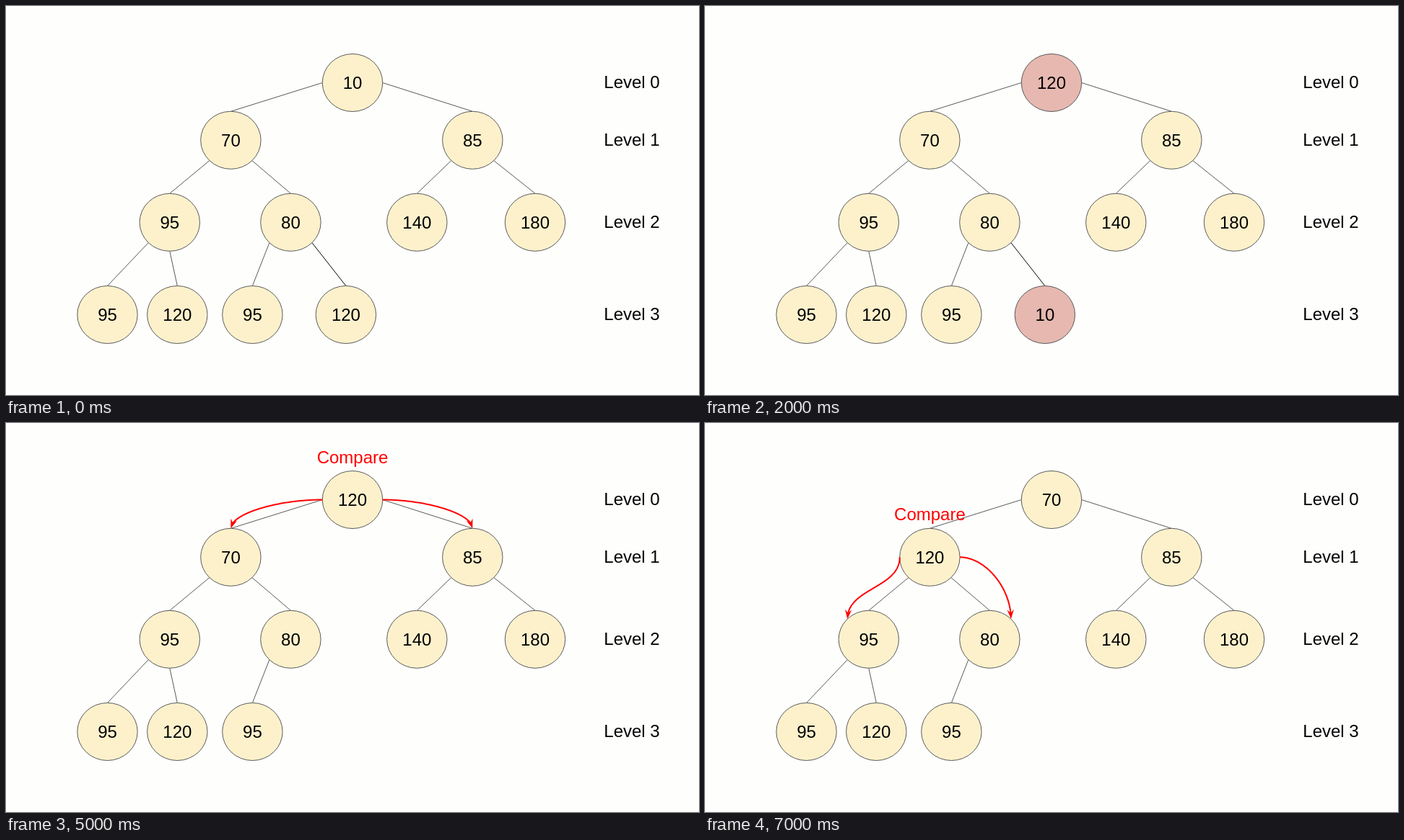
Animation of 960 by 540 pixels, one loop 8000 ms. Source, as an HTML page with a canvas:

```html
<!DOCTYPE html>
<html lang="en">
<head>
<meta charset="utf-8">
<title>Heap removal</title>
<style>
html, body { margin: 0; width: 100%; height: 100%; overflow: hidden; background: #fefffd; }
canvas { display: block; }
</style>
</head>
<body>
<canvas id="stage" width="960" height="540"></canvas>
<script>
(() => {
const ctx = document.getElementById('stage').getContext('2d');
const STEP = 1000;
const RX = 41.7, RY = 40;
const PAPER = '#fefffd', CREAM = '#fdf1cc', PINK = '#e6b8b0', CORAL = '#e06666', MINT = '#d9ead3';
const RED = '#ff0000', GREEN = '#6aa84f', LINE = '#595959';

// Node centres in heap order.
const nodes = [
  [480, 106.5], [311.4, 186.3], [646.3, 186.3],
  [226.8, 300.3], [394.4, 300.3], [569.3, 300.3], [733, 300.3],
  [140.5, 428.5], [237.3, 428.5], [341.4, 428.5], [470.9, 428.5]
];
const LAST = nodes.length - 1;
const values = [10, 70, 85, 95, 80, 140, 180, 95, 120, 95, 120];
const levels = [106, 185.8, 299.8, 428];

// Point on a node's rim, with dx and dy in units of its radii.
const rim = (i, dx, dy) => [nodes[i][0] + dx * RX, nodes[i][1] + dy * RY];
const leftOf = i => rim(i, -1, 0);
const rightOf = i => rim(i, 1, 0);
const topOf = i => rim(i, 0, -1);
const cornerOf = (i, sx, sy) => rim(i, sx * Math.SQRT1_2, sy * Math.SQRT1_2);

function drawText(str, x, baseline, color = '#000', align = 'center') {
  ctx.font = '24px "Liberation Sans", Arial, sans-serif';
  ctx.textAlign = align;
  ctx.fillStyle = color;
  ctx.fillText(str, x, baseline);
}

function drawEdge(child) {
  const parent = (child - 1) >> 1;
  const side = child % 2 ? -1 : 1;
  let from = cornerOf(parent, side, 1);
  if (parent === 0) from = rim(0, side, 0);
  if (child === 8) from = rim(parent, 0, 1);
  ctx.strokeStyle = child === LAST ? '#000' : LINE;
  ctx.beginPath();
  ctx.moveTo(...from);
  ctx.lineTo(...topOf(child));
  ctx.stroke();
}

function drawNode(i, value, fill) {
  const [x, y] = nodes[i];
  ctx.strokeStyle = LINE;
  ctx.beginPath();
  ctx.ellipse(x, y, RX, RY, 0, 0, Math.PI * 2);
  ctx.fillStyle = fill;
  ctx.fill();
  ctx.stroke();
  drawText(value, x, y + 8.8);
}

function drawTree({ swaps = {}, fills = {}, leaf = true }) {
  const count = leaf ? LAST + 1 : LAST;
  ctx.lineWidth = 1;
  for (let i = 1; i < count; i++) drawEdge(i);
  for (let i = 0; i < count; i++) drawNode(i, swaps[i] ?? values[i], fills[i] || CREAM);
  levels.forEach((y, i) => drawText('Level ' + i, 828.3, y + 8.4, '#000', 'left'));
}

function bezier([a, b, c, d], t) {
  const u = 1 - t;
  return [0, 1].map(k =>
    u * u * u * a[k] + 3 * u * u * t * b[k] + 3 * u * t * t * c[k] + t * t * t * d[k]);
}

// Stealth arrowhead whose mitred point lands on the tip.
function drawHead(tip, from) {
  ctx.save();
  ctx.translate(...tip);
  ctx.rotate(Math.atan2(tip[1] - from[1], tip[0] - from[0]));
  ctx.translate(-6.9, 0);
  ctx.beginPath();
  ctx.moveTo(0, 0);
  ctx.lineTo(-2.25, 2.25);
  ctx.lineTo(3.93, 0);
  ctx.lineTo(-2.25, -2.25);
  ctx.closePath();
  ctx.fill();
  ctx.stroke();
  ctx.restore();
}

function drawArrow(curves, color, bothEnds) {
  const points = curves.flatMap(c => Array.from({ length: 121 }, (_, i) => bezier(c, i / 120)));
  const start = points[0], end = points[points.length - 1];
  const clear = (p, q) => Math.hypot(p[0] - q[0], p[1] - q[1]) >= 6.9;
  const shaft = points.filter(p => clear(p, end) && (!bothEnds || clear(p, start)));
  ctx.strokeStyle = ctx.fillStyle = color;
  ctx.lineWidth = 2;
  ctx.beginPath();
  shaft.forEach(p => ctx.lineTo(...p));
  ctx.stroke();
  drawHead(end, shaft[shaft.length - 1]);
  if (bothEnds) drawHead(start, shaft[0]);
}

// Leaves horizontally, arrives vertically.
const bend = (a, b) => [a, [(a[0] + b[0]) / 2, a[1]], [b[0], (a[1] + b[1]) / 2], b];

// Leaves and arrives vertically.
function sway(a, b) {
  const mid = (a[1] + b[1]) / 2;
  return [a, [a[0], mid], [b[0], mid], b];
}

// Loops out to the right and back.
function loop(a, b, x) {
  const far = [x, (a[1] + b[1]) / 2];
  return [bend(a, far), bend(b, far).reverse()];
}

const rootSwap = { 0: 120, [LAST]: 10 };
const firstSwap = { 0: 70, 1: 120 };
const pruned = { swaps: rootSwap, leaf: false };

const scenes = [
  () => drawTree({}),
  () => {
    drawTree({});
    drawArrow(loop(rightOf(0), rightOf(LAST), 812), RED, true);
  },
  () => drawTree({ swaps: rootSwap, fills: { 0: PINK, [LAST]: PINK } }),
  () => {
    drawTree({ swaps: rootSwap, fills: { [LAST]: CORAL } });
    drawTree(pruned); // a stacked copy darkens the lines and labels
    drawText('Remove', 528.5, 437.3, RED, 'left');
  },
  () => {
    drawTree(pruned);
    drawTree(pruned);
  },
  () => {
    drawTree(pruned);
    drawArrow([bend(leftOf(0), topOf(1))], RED);
    drawArrow([bend(rightOf(0), topOf(2))], RED);
    drawText('Compare', 480, 55.6, RED);
  },
  () => {
    drawTree({ swaps: firstSwap, fills: { 0: MINT, 1: MINT }, leaf: false });
    drawArrow([bend(leftOf(0), topOf(1))], GREEN, true);
    drawText('Swap', 332, 100.6, GREEN);
  },
  () => {
    drawTree({ swaps: firstSwap, leaf: false });
    drawArrow([sway(leftOf(1), cornerOf(3, -1, -1))], RED);
    drawArrow([bend(rightOf(1), cornerOf(4, 1, -1))], RED);
    drawText('Compare', 311.4, 135.4, RED);
  }
];

const began = performance.now();

function render() {
  const step = Math.floor((performance.now() - began) / STEP) % scenes.length;
  ctx.fillStyle = PAPER;
  ctx.fillRect(0, 0, 960, 540);
  scenes[step]();
  requestAnimationFrame(render);
}
render();
})();
</script>
</body>
</html>
```
